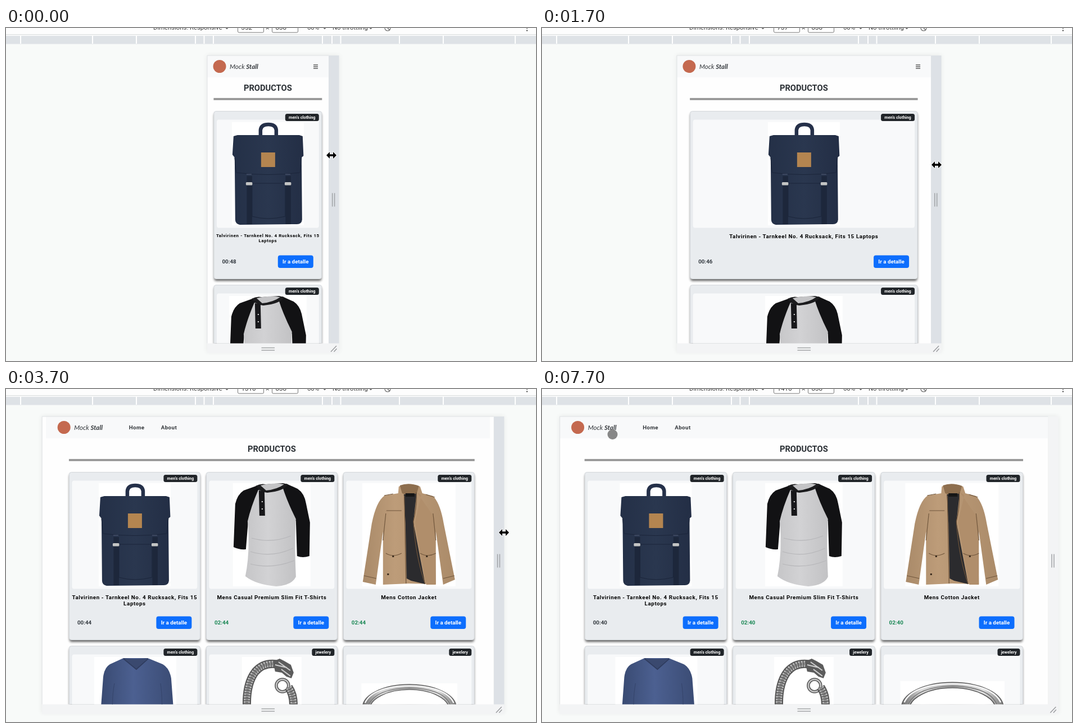
Animation, 943 px wide and 594 px high, one loop 8000 ms. Source, as an HTML page:

```html
<!DOCTYPE html>
<html lang="es">
<head>
<meta charset="utf-8">
<title>Responsive shop</title>
<style>
html, body { margin: 0; width: 100%; height: 100%; overflow: hidden; background: #f8faf9; }
svg { display: block; width: 100vw; height: 100vh; font-family: Roboto, sans-serif; }
</style>
</head>
<body>
<svg id="stage" viewBox="0 0 943 594" preserveAspectRatio="none">
  <defs>
    <filter id="soft" x="-10%" y="-10%" width="120%" height="120%"><feGaussianBlur stdDeviation="2.2"/></filter>
    <filter id="halo" x="-10%" y="-10%" width="120%" height="120%"><feGaussianBlur stdDeviation="4"/></filter>
    <linearGradient id="steel" x1="0" x2="1">
      <stop offset="0" stop-color="#666"/><stop offset=".2" stop-color="#ddd"/><stop offset=".5" stop-color="#aaa"/>
      <stop offset=".8" stop-color="#e4e4e4"/><stop offset="1" stop-color="#777"/>
    </linearGradient>
    <linearGradient id="cloth" x1="0" x2="1">
      <stop offset="0" stop-color="#c6c6c8"/><stop offset=".45" stop-color="#d2d2d4"/><stop offset="1" stop-color="#c2c2c4"/>
    </linearGradient>
    <linearGradient id="navy" x1="0" x2="1">
      <stop offset="0" stop-color="#243047"/><stop offset=".5" stop-color="#2a374f"/><stop offset="1" stop-color="#232e45"/>
    </linearGradient>
    <linearGradient id="blue" x1="0" x2="1">
      <stop offset="0" stop-color="#384970"/><stop offset=".45" stop-color="#4c6091"/><stop offset="1" stop-color="#3a4b73"/>
    </linearGradient>
    <linearGradient id="tan" x1="0" x2="1">
      <stop offset="0" stop-color="#a98a69"/><stop offset=".35" stop-color="#bd9c79"/><stop offset="1" stop-color="#ab8b69"/>
    </linearGradient>
    <clipPath id="view"><rect id="viewBox" y="49" height="513.5"/></clipPath>
  </defs>
  <g id="scene"></g>
</svg>
<script>
const ZOOM = 0.6135, MID = 466, LOOP = 8000;

// time, viewport width, pointer x, pointer y
const drag = [
  [300, 352, 579, 227], [900, 500, 640, 233], [1200, 650, 676, 238],
  [1700, 737, 702, 244], [2100, 848, 743, 249], [2400, 970, 774, 252]
];
const jumps = [
  [2400, 970, 774, 252], [3700, 1310, 886, 256], [3900, 1366, 900, 256], [4100, 1400, 904, 255],
  [4200, 1416, 904, 255], [5300, 1416, 905, 254], [5600, 1416, 886, 250], [5800, 1416, 616, 224],
  [6000, 1416, 333, 168], [6200, 1416, 195, 109], [6400, 1416, 187, 76], [6500, 1416, 185, 74],
  [6700, 1416, 186, 74], [7200, 1416, 201, 74], [7400, 1416, 203, 80], [7700, 1416, 125.5, 81]
];
const ticks = [500, 1500, 2500, 3500, 4400, 5600, 6400, 7400];
const lateTicks = [500, 1500, 2500, 3500, 4600, 5600, 6500, 7700];
const marks = [26, 154, 232, 337, 352.5, 369, 563, 580, 595.5, 700, 778, 906];

const rect = (x, y, w, h, fill, more = '') =>
  `<rect x="${x}" y="${y}" width="${w}" height="${h}" fill="${fill}" ${more}/>`;
const path = (d, fill, more = '') => `<path d="${d}" fill="${fill}" ${more}/>`;
const line = (d, color, width = 1, more = '') =>
  path(d, 'none', `stroke="${color}" stroke-width="${width}" ${more}`);
const circle = (x, y, r, fill, more = '') => `<circle cx="${x}" cy="${y}" r="${r}" fill="${fill}" ${more}/>`;
const text = (x, y, s, size, fill, more = '') =>
  `<text x="${x}" y="${y}" font-size="${size}" fill="${fill}" ${more}>${s}</text>`;
const BOLD = 'font-weight="700"', CENTER = 'text-anchor="middle"';

// Pictures: x is measured from the card centre, y as in the first row.
function backpack() {
  const strap = x => rect(x, 264, 9.5, 86, '#1d273b') + rect(x - 1.5, 275, 11.5, 5.5, '#c4c5c4', 'rx="1.5"');
  return rect(-64, 168, 128, 184, '#fff') +
    line('M-13 194V182Q-12 172 1 172Q14 172 15 182V194', '#253049', 6.5) +
    path('M-61 193L-54 191H56L62 193 63.5 228 60 231 61 342Q60 350 52 350L-50 351Q-58 349 -58 342L-59 231-63 226Z', 'url(#navy)') +
    line('M-59 231-56 258Q0 265 57 258L60 231M-28 277H31V336Q0 344-28 336Z', '#1b253a', 1) +
    line('M-38 261h9M31 261h9', '#57617a', 1) +
    strap(-37.5) + strap(31.5) + rect(-12, 222, 25, 26, '#b48550');
}

function raglan() {
  return rect(-69, 168, 138, 184, '#fff') +
    path('M-25 172-50 181Q-61 188-65 205L-68 282Q-58 287-46 286L-42 236-14 188Z', '#121214') +
    path('M26 169 46 178Q58 186 61 204L68 238 67 298Q55 302 45 298L43 236 14 178Z', '#121214') +
    path('M-24 180Q-4 186 19 174Q27 200 43 232Q40 270 43 335Q36 350 8 352Q-28 349-47 334Q-38 290-43 236Q-37 210-24 180Z', 'url(#cloth)') +
    path('M-29 173Q-20 168-11 170L20 168 29 170Q22 182-8 185Q-20 184-29 173Z', '#1b1b1d') +
    path('M-20 172Q5 166 22 170Q10 179-10 181Z', '#c4c4c6') +
    path('M-23 181-13 182-12 226H-22Z', '#17171a') +
    line('M-17 200v2M-17 213v2', '#ddd', 2) +
    line('M-38 290Q0 302 38 284M-38 312Q0 322 40 306M-36 266Q0 276 34 262', '#b6b6b9', 1.2);
}

function jacket() {
  return rect(-83, 168, 166, 184, '#fff') +
    path('M-18 174Q0 166 20 174L24 186 43 191Q56 204 62 240L82 340 61 349 48 254 48 348 0 347-46 349-46 254-59 349-82 344-66 240Q-58 200-43 190L-19 186Z', 'url(#tan)') +
    path('M-9 188 14 184 8 238 29 348 4 342-4 338-6 240Z', '#2b2b2e') +
    path('M-16 172Q0 166 18 173L14 186Q0 192-12 186Z', '#8d6e4e') +
    rect(-6, 186, 16, 6, '#161616') +
    path('M14 184 22 189 11 238 31 349H48L46 230Z', '#b08e6b') +
    line('M-40 217h27M-41 293q13 8 28 0M20 293q14 8 28 0M-46 270l5-48M48 270l-5-48M-80 333l22 5M61 338l20-5M-44 190l16-3M30 188l16 5', '#71573d', 1.2) +
    line('M13 184Q15 206 8 236Q12 300 29 348M-8 190-5 347', '#6c5239', 1.2) +
    line('M-28 297v3M32 297v3M-37 329v3', '#3a2b1d', 3);
}

function sweater() {
  return rect(-72, 168, 146, 184, '#fff') +
    path('M-20 170-44 181Q-54 187-56 204L-63 300-40 320-38 350H47L49 320 72 300 65 206Q62 188 50 181L23 170Z', 'url(#blue)') +
    path('M-20 170Q2 173 23 170L3 189Z', '#3a496f') +
    line('M-20 171 3 190 24 171', '#2f3c5e', 2) +
    line('M-36 215Q-41 240-39 280M46 215Q50 240 48 280', '#36466d', 1.2);
}

function bracelet() {
  const chain = d => line(d, '#555', 15) + line(d, '#b4b4b4', 11, 'stroke-dasharray="3 1.6"') +
    line(d, '#777', 5, 'stroke-dasharray="2 2.6"');
  return rect(-53, 168, 106, 184, '#fff') +
    chain('M-44 264Q-47 217-29 194Q-14 177 10 181') +
    path('M2 176 14 171 22 175 34 182 39 196 35 206 26 203 18 196 6 194Z', '#5c5c5c') +
    line('M6 182 27 187M12 177 33 192M17 190 33 202', '#cfcfcf', 2) +
    circle(19, 219, 11, 'none', 'stroke="#555" stroke-width="5.5"') +
    circle(19, 219, 11, 'none', 'stroke="#c4c4c4" stroke-width="2.5"') +
    chain('M30 222Q41 238 38 264');
}

function ring() {
  return rect(-92, 211, 186, 98, '#fff') +
    '<ellipse cx="1" cy="258" rx="91" ry="45" fill="url(#steel)" stroke="#555" stroke-width="1.3"/>' +
    '<ellipse cx="1" cy="262" rx="77" ry="39" fill="#fff" stroke="#555" stroke-width="1.5"/>' +
    line('M-85 249Q-70 217 1 216Q72 217 87 249', '#f4f4f4', 2.5) +
    line('M-78 252Q-62 221 1 220Q66 221 80 252', '#777', 1.5);
}

const MEN = "men's clothing";
const goods = [
  { art: backpack, kind: MEN, name: 'Talvirinen - Tarnkeel No. 4 Rucksack, Fits 15 Laptops', long: true },
  { art: raglan, kind: MEN, name: 'Mens Casual Premium Slim Fit T-Shirts' },
  { art: jacket, kind: MEN, name: 'Mens Cotton Jacket' },
  { art: sweater, kind: MEN, name: '' },
  { art: bracelet, kind: 'jewelery', name: '' },
  { art: ring, kind: 'jewelery', name: '' }
];

function card(item, i, x, w, row, big, clock) {
  const cx = w / 2, size = big ? 9.8 : 7.85, base = big ? 375 : 373;
  const wrap = item.long && w - 12 < (big ? 260 : 214);
  const cut = item.name.lastIndexOf(' ');
  const rows = wrap ? [item.name.slice(0, cut), item.name.slice(cut + 1)] : [item.name];
  const tag = item.kind === MEN ? 60 : 40;
  const fit = item.art === ring ? (w - 12) / 242 : 1;
  return `<g transform="translate(${x} ${row * 310})">` +
    rect(1, 152, w - 2, 299, '#000', 'rx="4" opacity=".62" filter="url(#soft)"') +
    rect(0.5, 148.5, w - 1, 299, '#e9ecef', 'rx="4" stroke="#d3d7db"') +
    rect(5.5, 163.5, w - 11, 193, '#f8f9fa', 'rx="4"') +
    `<g transform="translate(${cx} ${260 * (1 - fit)}) scale(${fit})">${item.art()}</g>` +
    rect(w - 5.5 - tag, 153, tag, 13, '#212529', 'rx="3.5"') +
    text(w - 5.5 - tag / 2, 161.8, item.kind, 7.36, '#fff', BOLD + CENTER) +
    rows.map((s, n) => text(cx, base + n * size * 1.12, s, size, '#000', BOLD + CENTER + ' letter-spacing=".61"')).join('') +
    text(15, 419.8, clock, 9.8, i ? '#198754' : '#343a40', BOLD) +
    rect(w - 78.5, 405.5, 63, 22.5, '#0d6efd', 'rx="4"') +
    text(w - 47, 419.8, 'Ir a detalle', 9.8, '#fff', BOLD + CENTER) + '</g>';
}

function toolbar(width) {
  const arrow = x => line(`M${x - 3}-1.5l3 3 3-3`, '#555', 1.2);
  const field = (x, v) => rect(x, -12, 46, 20, '#fff', 'rx="2" stroke="#777"') + text(x + 6, 3.4, v, 11.6, '#333');
  return rect(0, 0, 943, 12, '#fdfdfd') + rect(0, 11.5, 943, 1, '#c6c9ca') + rect(0, 12.5, 943, 1.5, '#fff') +
    rect(0, 14, 943, 14.5, '#dee2e6') + marks.map(x => rect(x - 1, 14, 2, 14, '#fff')).join('') +
    text(262, 3.4, 'Dimensions: Responsive', 11.3, '#444') + arrow(393) +
    field(412.5, width) + field(473.5, 838) + text(462, 3.6, '×', 12, '#555') +
    text(536, 3.4, '60%', 11.3, '#444') + arrow(567) + text(581, 3.4, 'No throttling', 11.3, '#444') + arrow(649) +
    circle(679, 0, 5, 'none', 'stroke="#666" stroke-width="1.2"') + line('M674-5l9 9', '#666', 1.2) +
    circle(927, 0, 1.2, '#555') + circle(927, 4.5, 1.2, '#555');
}

function page(s, L, R) {
  const full = R - L, left = L + s.shift, W = s.width;
  const pad = W >= 1200 ? 10 : 0, cols = W >= 992 ? 3 : W >= 768 ? 2 : 1;
  const x0 = left + full * 0.05 + 0.6, inner = full * 0.9 - 1.5, w = (inner - 10 * (cols - 1)) / cols;
  const nav = (x, name) => text(left + x + pad, 71.8, name, 9.8, '#33373b', BOLD + ' letter-spacing=".4"');
  const logo = left + 40 + pad;
  let out = rect(L, 49, full, 514, '#fefefe') + rect(left, 49, full - 2 * s.shift, 39, '#f8f9fa') +
    circle(left + 22 + pad, 68.5, 11.5, '#c4694f') +
    text(logo, 73, `Mock <tspan ${BOLD}>Stall</tspan>`, 11.6, '#33373b', 'font-style="italic" font-family="Lato, sans-serif"');
  if (W >= 768) out += nav(137.5, 'Home') + nav(194.5, 'About');
  else out += [65.8, 68.9, 72].map(y => rect(R - 27, y - 0.6, 8, 1.3, '#444')).join('');
  out += text(x0 + inner / 2, 111.6, 'PRODUCTOS', 14.7, '#2a2f34', BOLD + CENTER) +
    rect(x0, 125.2, inner, 1.1, '#4c4c4c') + rect(x0, 127.2, inner, 1.1, '#4c4c4c');
  for (let i = 0; i < cols * 2; i++) {
    const clock = i ? '02:' + (48 - s.late) : '00:' + (48 - s.early);
    out += card(goods[i], i, x0 + (i % cols) * (w + 10), w, Math.floor(i / cols), W >= 576, clock);
  }
  return `<g clip-path="url(#view)">${out}</g>`;
}

function pointer(s) {
  if (s.touch) return circle(s.x, s.y, 9, '#878787');
  return path('M-9 0l6-6v4.2h6v-4.2l6 6-6 6v-4.2h-6v4.2z', '#000',
    `stroke="#fff" stroke-width="1.4" paint-order="stroke" transform="translate(${s.x} ${s.y})"`);
}

function state(t) {
  let key;
  if (t < 2400) {
    const at = Math.max(t, 300);
    const n = drag.findIndex(k => k[0] > at), a = drag[n - 1], b = drag[n];
    const f = (at - a[0]) / (b[0] - a[0]);
    key = a.map((v, i) => v + (b[i] - v) * f);
  } else key = jumps.filter(k => k[0] <= t).pop();
  const seen = t >= 2400 && t < 3700 ? 2400 : t;
  const count = list => list.filter(v => v <= seen).length;
  return {
    width: Math.round(key[1]), x: key[2], y: key[3],
    shift: t >= 3700 && t < 3900 ? 7 : 0,
    early: count(ticks), late: count(lateTicks),
    touch: t >= 5600, hint: t >= 400 && t < 1300
  };
}

const scene = document.getElementById('scene'), view = document.getElementById('viewBox');

function draw(t) {
  const s = state(t), half = s.width * ZOOM / 2, L = MID - half, R = MID + half;
  view.setAttribute('x', L);
  view.setAttribute('width', R - L);
  let out = rect(0, 0, 943, 594, '#f8faf9') + toolbar(s.width) +
    rect(L - 1, 48, R - L + 20, 530, '#000', 'opacity=".06" filter="url(#halo)"') +
    rect(L, 562, R - L + 18.5, 18, '#f3f4f5') +
    rect(R, 49, 18.5, 513.5, s.touch ? '#f3f4f5' : '#dde1e6') + page(s, L, R) +
    line(`M${L} 562.5V49H${R}`, '#dfe2e4', 1) +
    line('M454.5 570.5h23.5M454.5 574.8h23.5', '#a4a6a8', 1.5) +
    line(`M${R + 6.7} 294.5v24M${R + 10.6} 294.5v24`, '#a0a3a6', 1.5) +
    line(`M${R + 4} 577.5l10-10.5M${R + 9.5} 577.5l5-5.5`, '#9b9da0', 1.5);
  if (s.hint) {
    out += rect(R - 93, 50, 93, 23.5, '#fff', 'opacity=".85"') +
      text(R - 5.5, 66, `${s.width}px × 838px`, 13.1, '#505256',
        'text-anchor="end" font-family="Liberation Sans, sans-serif"');
  }
  scene.innerHTML = out + pointer(s);
}

let shown = -1;
function frame(now) {
  const t = Math.floor(now % LOOP / 100) * 100;
  if (t !== shown) draw(shown = t);
  requestAnimationFrame(frame);
}
draw(0);
requestAnimationFrame(frame);
</script>
</body>
</html>
```
